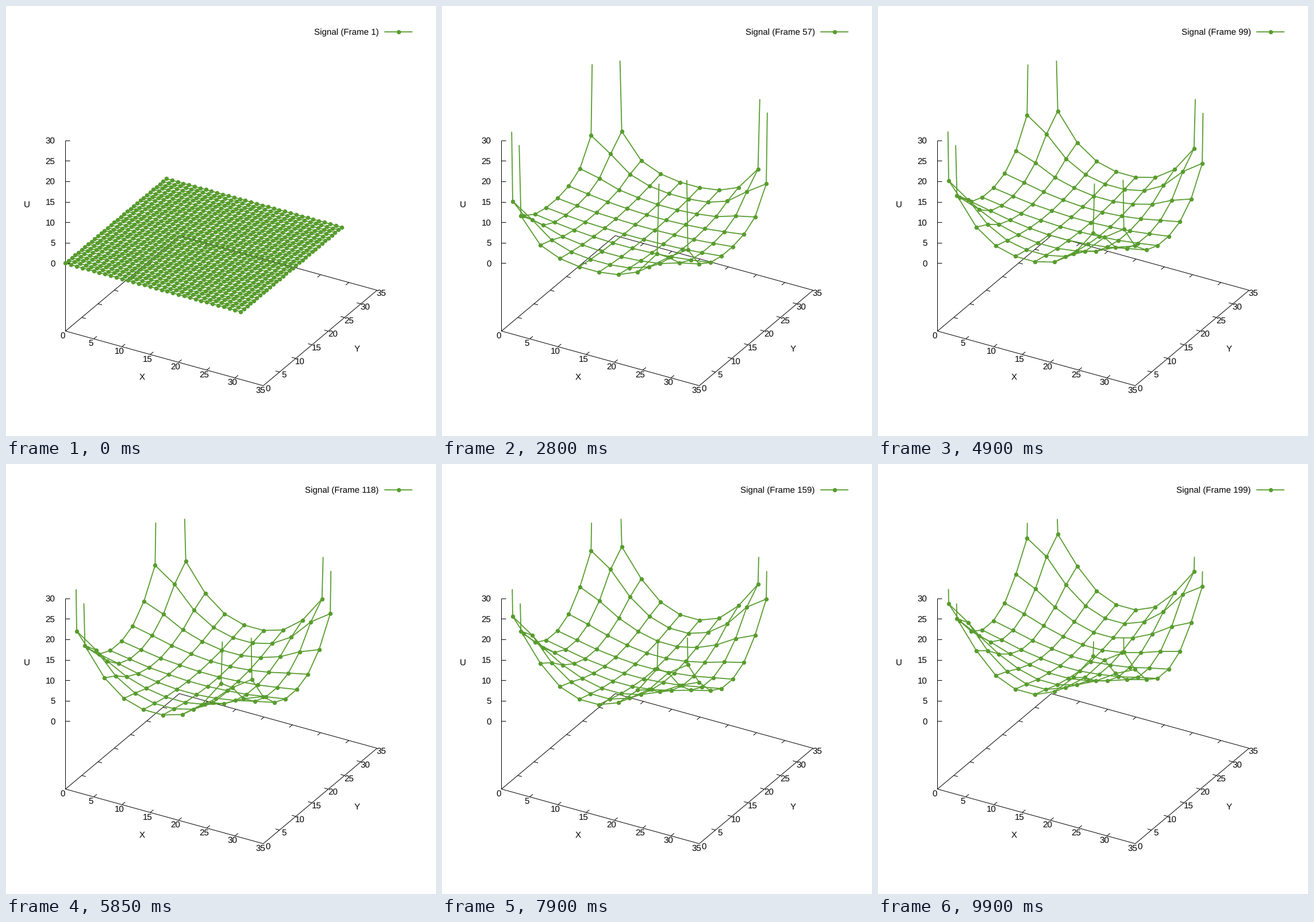
A matplotlib script for the animation above (9950 ms loop, 748 by 748 pixels).

```python
import numpy as np
import matplotlib.pyplot as plt
from matplotlib.animation import FuncAnimation
from matplotlib.collections import LineCollection

SIZE, DPI = 748, 100
FRAMES, INTERVAL = 199, 50
PX = 72 / DPI                 # one pixel in points
GREEN = "#589c2e"
CELLS, COARSE = 32, 10
TOP, FLOOR, AXIS_END = 30, -16.54, 35
HOT = 200                     # fixed value at the four corners

plt.rcParams["font.family"] = "Liberation Sans"
plt.rcParams["text.hinting"] = "no_hinting"


def project(x, y, z):
    """Plot coordinates to stage pixels."""
    sx = 103 + 9.829 * x + 5.657 * y
    sy = 447 + 2.714 * x - 4.743 * y - 7.133 * z
    return np.stack(np.broadcast_arrays(sx, sy), axis=-1)


# --- heat spreading from the corners, resampled on a coarse grid ---

def mesh(n):
    side = np.linspace(0, CELLS - 1, n)
    return np.meshgrid(side, side, indexing="ij")


def distance_weights():
    """Inverse-distance weights from the fine grid to the coarse one."""
    fx, fy = (a.ravel() for a in mesh(CELLS))
    cx, cy = (a.ravel()[:, None] for a in mesh(COARSE))
    w = 1 / np.maximum(np.hypot(cx - fx, cy - fy), 1e-9)
    return w / w.sum(axis=1, keepdims=True)


def diffuse(steps, rate=0.1):
    """Coarse surface after every diffusion step; no flow through the edges."""
    weights = distance_weights()
    corners = np.ix_([0, -1], [0, -1])
    u = np.zeros((CELLS, CELLS))
    u[corners] = HOT
    out = []
    for _ in range(steps):
        out.append(weights @ u.ravel())
        p = np.pad(u, 1, mode="edge")
        around = p[2:, 1:-1] + p[:-2, 1:-1] + p[1:-1, 2:] + p[1:-1, :-2]
        u = u + rate * (around - 4 * u)
        u[corners] = HOT
    return np.array(out)


surfaces = diffuse(1000)

# Diffusion speed, fitted to the height next to a corner at a few moments
moments = np.array([23, 56, 98, 136, 158, 198])
heights = [7.09, 12.83, 17.87, 21.44, 23.26, 26.33]
reached = np.interp(heights, surfaces[:, 1], np.arange(len(surfaces)))
terms = np.stack([moments, moments ** 2], axis=1)
speed, drift = np.linalg.lstsq(terms, reached, rcond=None)[0]


def surface_at(i):
    t = np.clip(speed * i + drift * i * i, 0, len(surfaces) - 1.001)
    k = int(t)
    z = surfaces[k] + (t - k) * (surfaces[k + 1] - surfaces[k])
    return z.reshape(COARSE, COARSE)


def wire(z):
    """Grid segments cut off at the top of the box, and the visible points."""
    pts = np.stack([*mesh(len(z)), z], axis=-1)
    a = np.concatenate([pts[:-1].reshape(-1, 3), pts[:, :-1].reshape(-1, 3)])
    b = np.concatenate([pts[1:].reshape(-1, 3), pts[:, 1:].reshape(-1, 3)])
    swap = (a[:, 2] > b[:, 2])[:, None]
    low, high = np.where(swap, b, a), np.where(swap, a, b)
    rise = np.maximum(high[:, 2] - low[:, 2], 1e-9)
    cut = np.where(high[:, 2] > TOP, (TOP - low[:, 2]) / rise, 1)
    high = low + cut[:, None] * (high - low)
    segments = np.stack([project(*low.T), project(*high.T)], axis=1)
    seen = pts[pts[..., 2] <= TOP]
    return segments, project(*seen.T)


# --- stage ---

fig = plt.figure(figsize=(SIZE / DPI, SIZE / DPI), dpi=DPI, facecolor="white")
ax = fig.add_axes([0, 0, 1, 1])
ax.set_xlim(-0.5, SIZE - 0.5)
ax.set_ylim(SIZE - 0.5, -0.5)
ax.axis("off")


def label(x, y, text, ha="center"):
    """Text whose capitals are centred on y."""
    return ax.text(x, y + 5.3, text, ha=ha, va="baseline",
                   fontsize=15.1 * PX, color="black")


def draw_axes():
    end = AXIS_END
    base = [project(x, y, FLOOR) for x, y in
            [(0, 0), (end, 0), (end, end), (0, end), (0, 0)]]
    lines = [base, [project(0, 0, FLOOR), project(0, 0, TOP)]]
    along_x = np.array([7, 1.9])
    along_y = np.array([5.4, -4.5])
    for v in range(0, end + 1, 5):
        front, back = project(v, 0, FLOOR), project(v, end, FLOOR)
        left, right = project(0, v, FLOOR), project(end, v, FLOOR)
        if 0 < v < end:
            lines += [[front, front + along_y], [back, back - along_y],
                      [left, left + along_x], [right, right - along_x]]
        label(front[0] - 5, front[1] + 7, str(v))
        label(right[0] + 7.6, right[1] + 4.3, str(v))
        if v <= TOP:
            tick = project(0, 0, v)
            lines.append([tick, tick + [8, 0]])
            label(85, tick[1], str(v), ha="right")
    ax.add_collection(LineCollection(lines, colors="black", linewidths=PX,
                                     zorder=1))
    label(236, 644, "X")
    label(610, 595, "Y")
    label(36, 344, "U")


draw_axes()

stroke = 1.8 * PX
dot = dict(marker="o", ms=7.4 * PX, mew=0, color=GREEN)
ax.plot([659, 706], [44.5, 44.5], color=GREEN, lw=stroke)
ax.plot([682.5], [44.5], **dot)
title = label(648, 44.5, "", ha="right")

lines = LineCollection([], colors=GREEN, linewidths=stroke, zorder=3)
ax.add_collection(lines)
dots, = ax.plot([], [], ls="none", zorder=4, **dot)


def update(i):
    z = surface_at(i) if i else np.zeros((CELLS, CELLS))
    segments, points = wire(z)
    lines.set_segments(segments)
    dots.set_data(points[:, 0], points[:, 1])
    title.set_text(f"Signal (Frame {i + 1})")
    return lines, dots, title


anim = FuncAnimation(fig, update, frames=FRAMES, interval=INTERVAL,
                     repeat=True, repeat_delay=0)
plt.show()
```
